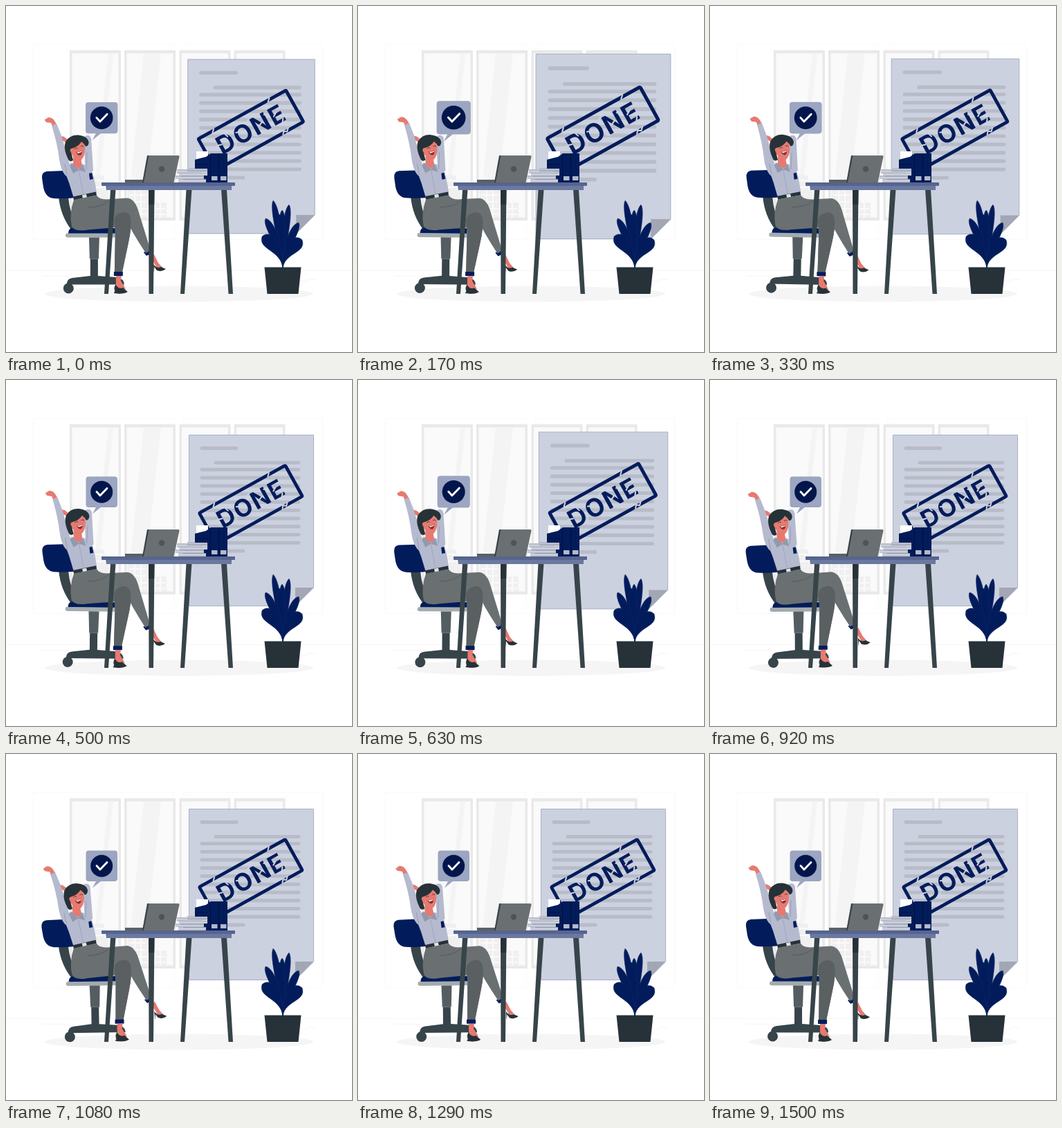
An HTML page that plays this animation: 500x500 px, repeating every 1.54 s.

```html
<!DOCTYPE html>
<html lang="en">
<head>
<meta charset="utf-8">
<title>Work done</title>
<style>
  html, body { margin: 0; width: 100%; height: 100%; overflow: hidden; background: #fff; }
  svg { display: block; width: 100%; height: 100%; }
  .navy { fill: #021c5b; }
  .dark { fill: #263238; }
  .slate { fill: #37444a; }
  .skin { fill: #e67a70; }
  .shirt { fill: #b5bacf; }
  .line { fill: none; stroke-linecap: round; stroke-linejoin: round; }
</style>
</head>
<body>
<svg viewBox="0 0 500 500">
  <defs>
    <g id="window">
      <path d="M92 64h74v246h-74z" fill="#e9e9e9"/>
      <path d="M95.500 68.500h67v237h-67z" fill="#fafafa"/>
    </g>
  </defs>

  <!-- Room -->
  <path d="M39.500 55.500h203.500v282h-203.500zM257 55.500h201v282h-201z" fill="none" stroke="#f9f9f9"/>
  <path d="M0 382.500h500M405 397.500h32M434 395.500h14M52 390.500h38" stroke="#f6f6f6"/>
  <use href="#window"/><use href="#window" x="79"/><use href="#window" x="158.500"/><use href="#window" x="237.500"/>
  <path d="M148 68.500h7l-25 237h-7zM199 68.500h25l-26 237h-23z" fill="#f4f4f4"/>
  <path d="M126 306v-61h16v20h6v41zM176 306v-40h28v18h28v22z" fill="#f0f0f0"/>
  <path d="M129 252h12m-12 10h12M178 273h24m-24 10h24m-24 10h52m-52 8h52M186 266v40m9-40v40m11-22v22m9-22v22m8-22v22" stroke="#fafafa" stroke-width="2"/>
  <ellipse cx="250" cy="416" rx="194" ry="11.500" fill="#f5f5f5"/>

  <!-- Document -->
  <g id="doc">
    <path d="M264.500 79.500H444.500V300L418 326.500H264.500Z" fill="#ccd1df" stroke="#9aa4c0" stroke-width=".8"/>
    <path d="M418 300H444.500L418 326.500Z" fill="#a3a6b4"/>
    <path class="line" stroke="#b8bcc8" stroke-width="5" d="M283 98.500h50M303 119.500h120M283 129.600h140m-140 11.750h140m-140 11.750h140m-140 11.750h140m-140 11.750h140m-140 11.750h140m-140 11.750h140m-140 11.750h140m-140 11.750h140m-140 11.750h140m-140 11.750h60"/>
    <g transform="translate(353.500 177.500) rotate(-29)">
      <rect x="-72" y="-23" width="142" height="51" rx="1.500" fill="none" stroke="#021c5b" stroke-width="4.700"/>
      <text x="0" y="13.500" text-anchor="middle" class="navy" font-family="Inter, sans-serif" font-weight="700" font-size="35" letter-spacing="1.800">DONE</text>
      <path class="line" stroke="#ccd1df" stroke-width="2" d="M-50 -21l4 -4M40 -21l4 -4M36 30l3 -4 4 3 4 -4M-54 -2l7 2M-36 -12l2 6M-32 14l4 -6M-21 -5l6 2M-1 10l5 4M0 -11l4 -2M12 3l6 -3M26 -8l5 3M37 1l5 -3M44 14l3 -4"/>
    </g>
  </g>

  <!-- Speech bubble -->
  <g id="bubble">
    <path d="M119.500 139.500H157Q161 139.500 161 143.500V180Q161 184 157 184H137L125 193.500 130 184H119.500Q115.500 184 115.500 180V143.500Q115.500 139.500 119.500 139.500Z" fill="#9ca5c1"/>
    <circle cx="138.200" cy="161.700" r="16" fill="#02164c"/>
    <path class="line" d="M131 161.500l5 5.500 10 -10.500" stroke="#fff" stroke-width="2.800"/>
  </g>

  <!-- Woman on the chair -->
  <g id="sitter">
    <path class="slate" d="M76 276h14q2 24 14 46l-9 2q-16 -20 -19 -48z"/>
    <path class="navy" d="M59 239L84 238Q90 238 92 244L102 277Q80 279 69 278 57 277 54 262L52 249Q51 240 59 239Z"/>
    <path class="navy" d="M94 321H158V329H90Q90 323 94 321Z"/>
    <path d="M87 328.500H158V334.500H89Q86 334 86 331.500Z" fill="#a3abae"/>
    <path d="M120 334.500h15l-1 31h-13z" fill="#545e62"/>
    <path class="slate" d="M122 365.500h11V390L160 392Q171 394 171 402.500H88Q88 394 96 393L122 390Z"/>
    <circle class="slate" cx="90.500" cy="408" r="7.500"/>
    <circle class="slate" cx="164" cy="408" r="7.500"/>

    <path class="skin" d="M67 174L73 171 70 166Q67 161 61 161L55.500 164.500 58 168 65 169Z"/>
    <path class="skin" d="M76 187l8 2 5 4 -3 4 -7 -4z"/>
    <path class="shirt" d="M66 173L73 170Q81 188 86 207L92 229 92 250 85 244Q79 236 77 222 74 198 66 173Z"/>
    <path class="shirt" d="M112 189Q121 184 123 192L126 238 115 243Z"/>
    <path class="shirt" d="M83 234Q92 226 106 227L122 232Q128 248 131 270L98 278Q92 256 83 234Z"/>
    <path d="M85 229l3 15M117 212l-1 24" class="line" stroke="#8f97ae" stroke-width=".8"/>

    <path class="skin" d="M97 215V230L105 235 110 231 108 220Z"/>
    <path class="skin" d="M92 206Q103 203 109 194 114.500 200 114 209 113 219 108.500 222.500 101 224 96 216 90 211 92 206Z"/>
    <path class="dark" d="M87 215Q83 204 86 196 92 186 104 186.500 118 188 119.500 197 119 203 115 203 113 199 109 196 104 204 94 206 91 208 94 212L97 223Q92 226 90 222Z"/>
    <path d="M101 210.500Q106 212 109 208.500 111 214 107 216 103 216 101 210.500Z" fill="#8b3034"/>
    <path d="M102 210.800Q106 212 109 209.200L109 211 104 213Z" fill="#fff"/>
    <path class="line" stroke="#263238" stroke-width=".8" d="M99 206.500q2 -3 4 -1M108 203q2 -2 4 0"/>
    <path d="M95 227L105 236 111 229 115 240 105 237 97 242 92 231Z" fill="#9299ad"/>
    <path d="M105 237l7 36" class="line" stroke="#9ba2b8" stroke-width=".8"/>
    <path class="navy" d="M120 242l4 -1 2 9 -5 1z"/>
    <path class="dark" d="M97 275.500L130 268.500 131 273.500 98 280.500Z"/>
    <path d="M110 273l6 -1 1 5 -6 1z" fill="#e0e2e8"/>

    <path class="skin" d="M208 361l6 -2 6 12 7 8 -9 -1z"/>
    <path class="dark" d="M213 373Q218 380 224 377L231 380Q225 385 218 382L214.500 377 214 386Z"/>
    <path class="navy" d="M199 356l8 -4 3 6 -7 3z"/>
    <path d="M98 280L131 273.500Q135 281 151 279L176 277.500Q185 279 190 292L209 353 202 357Q182 327 170 302L115 324Q98 326 95 318 91 300 98 280Z" fill="#6a7071"/>
    <path d="M112 324L158 302Q175 294 180 306 182 320 177 342L168 385H157L158 320Z" fill="#6a7071"/>
    <path d="M156 310Q158 300 168 298 178 297 180 306 182 320 177 342L168 385H157L158 330Z" fill="#5a6062"/>
    <path d="M118 291Q138 291 148 282" class="line" stroke="#50595a" stroke-width=".9"/>
    <path class="navy" d="M156 384h13v6h-13z"/>
    <path class="skin" d="M159 390h8l-1 7 7 12 -9 3 -5 -9z"/>
    <path class="dark" d="M158 402Q163 410 169 407L176 413Q170 417 156 415L158 411Z"/>
  </g>

  <!-- Desk -->
  <path class="slate" d="M151 265h7.500L148 416h-6zM206 265h8.500L213 416h-6.500zM260.500 265h8L258 416h-6zM311 265h8L328 416h-6.500z"/>
  <path class="dark" d="M206 265h8.500l-.3 22h-8z"/>
  <path d="M144 259h182v7h-181z" fill="#6b789f"/>
  <rect x="138" y="255" width="193" height="5" rx="1" fill="#56648f"/>
  <path d="M172 251h27v4.500h-27z" fill="#596164"/>
  <path d="M204 216h45l-8 39h-44z" class="slate"/>
  <path d="M206.500 216H249Q251 216 250.500 218L242.500 255H199Z" fill="#6a7071"/>
  <circle cx="225" cy="235.500" r="4.200" fill="#4c5558"/>

  <!-- Papers and binders -->
  <path d="M262 234h28v5h-28zM247 236h36v6h-36zM250 241h40v5h-40zM245 245h40v5h-40zM249 249h42v6h-42z" fill="#b9bdcb"/>
  <path d="M247 239h36M250 243.500h40M245 248h40M249 252.500h42" stroke="#d4d8e3" stroke-width="1.500"/>
  <path d="M262 238.500h28M252 246h38M256 250.500h34" stroke="#969cb0"/>
  <path d="M275 210h17v12h-17z" fill="#fff"/>
  <path class="navy" d="M273 222L289 218 296 213H320V255H289V250H286V245H291V235H273Z"/>
  <path d="M295.500 214v41M307.500 213v42M273 229h18" stroke="#00103c" stroke-width="1.200"/>
  <path d="M297 246h8.500v6h-8.500zM310 246h8.500v6h-8.500z" fill="#b3b9ce"/>

  <!-- Plant -->
  <g id="plant" class="navy" stroke="#10296a" stroke-width=".4"></g>
  <path class="dark" d="M373.500 377.500h53l-4 38.500h-45z"/>
</svg>
<script>
const LOOP = 1540, LEAD = 28;
const $ = id => document.getElementById(id);

// Each leaf: tip x, tip y, fullness, height where it leaves the stem
const leaves = [
  [386, 281, 9, 352], [409, 287, 9, 352], [399, 295, 8, 345], [395, 301, 9, 345],
  [375, 307, 11, 352], [423, 313, 11, 355], [370, 333, 20, 352], [428, 338, 20, 356]
];
function leafPath([tipX, tipY, full, forkY]) {
  const x = 400, y = 379, dx = x - tipX, dy = forkY - tipY, len = Math.hypot(dx, dy);
  const side = sign => ({
    low: `${x + sign * 3} ${forkY}`,
    high: `${tipX + dx * .15 + sign * full * dy / len} ${tipY + dy * .15 - sign * full * dx / len}`
  });
  const a = side(-1), b = side(1);
  return `<path d="M${x} ${y}C${a.low} ${a.high} ${tipX} ${tipY}C${b.high} ${b.low} ${x} ${y}Z"/>`;
}
$('plant').innerHTML = leaves.map(leafPath).join('');

// Linear interpolation through [time, value] stops
function track(stops, time) {
  const i = Math.max(1, stops.findIndex(stop => time <= stop[0]));
  const [t0, a] = stops[i - 1], [t1, b] = stops[i];
  return a + (b - a) * (time - t0) / (t1 - t0);
}
const beat = [[0, 1], [147, 1.1], [433, 1], [608, 1], [753, 1.1], [898, 1], [LOOP, 1]];
const sway = [[0, 0], [LOOP * .25, 1], [LOOP * .75, -1], [LOOP, 0]];

function scaleAbout(id, x, y, s) {
  $(id).setAttribute('transform', `translate(${x} ${y}) scale(${s}) translate(${-x} ${-y})`);
}
const start = performance.now();
function draw() {
  const time = (performance.now() - start + LEAD) % LOOP;
  const pulse = track(beat, time);
  scaleAbout('doc', 354.5, 203, pulse);
  scaleAbout('bubble', 138.2, 166.5, pulse);
  $('sitter').setAttribute('transform', `rotate(${track(sway, time)} 143 288)`);
  requestAnimationFrame(draw);
}
draw();
</script>
</body>
</html>
```
